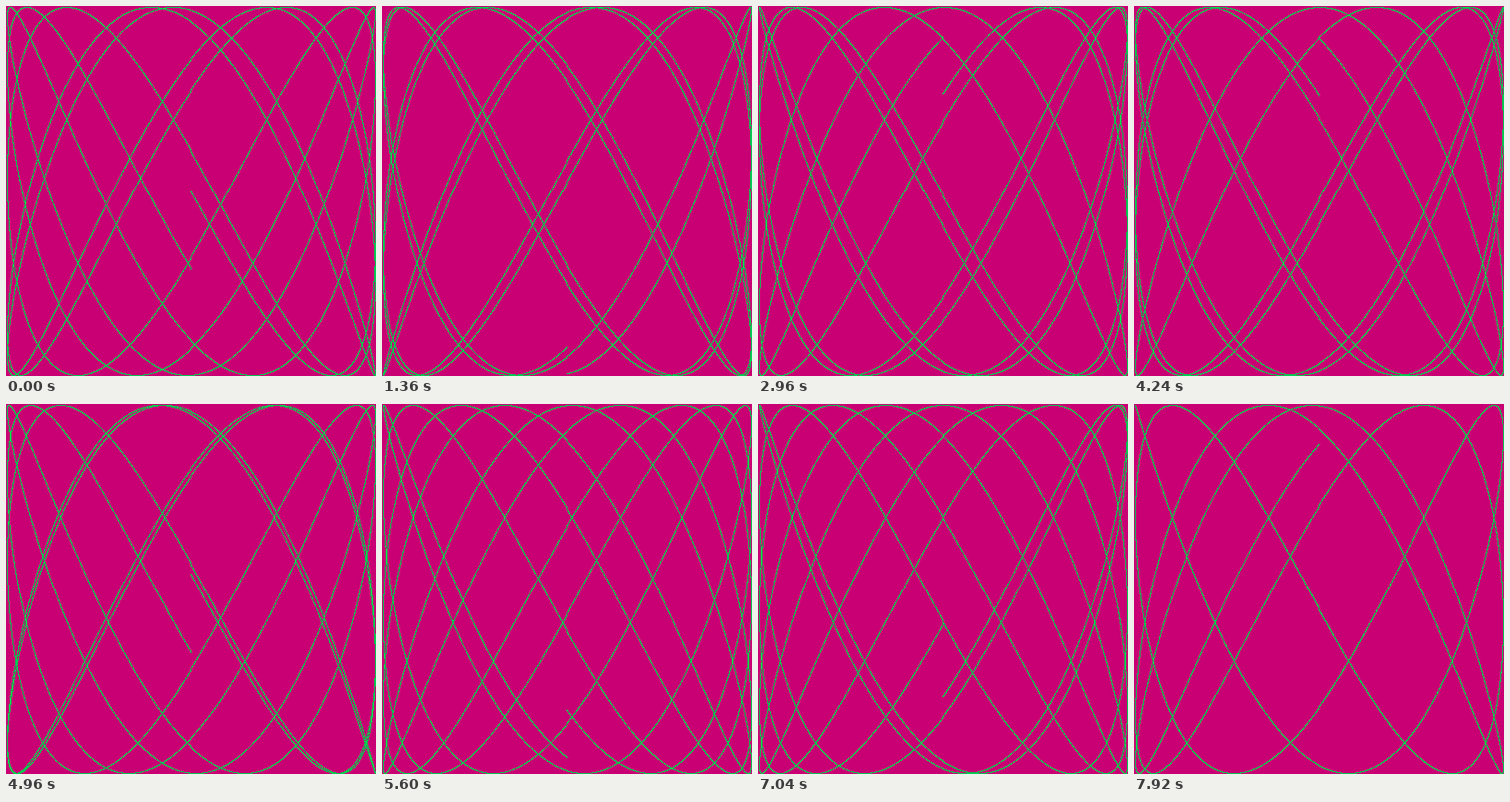
Write an HTML page with a canvas that moves like this. It is 401 px wide and 401 px high and loops after 8 s.

```html
<!DOCTYPE html>
<html lang="en">
<head>
<meta charset="utf-8">
<title>Lissajous</title>
<style>
  html, body { margin: 0; width: 100%; height: 100%; overflow: hidden; background: #c80073; }
  canvas { display: block; width: 401px; height: 401px; image-rendering: pixelated; }
</style>
</head>
<body>
<canvas id="stage" width="401" height="401"></canvas>
<script>
  const R = 200, SIDE = 2 * R + 1;
  const STEP_MS = 80, STEPS = 100;
  const CYCLES = 5, RES = 0.001;
  const FREQ = 1.8139808639388587, PHASE_STEP = 0.1;
  const BACK = [200, 0, 115], LINE = [0, 200, 80];

  const ctx = document.getElementById('stage').getContext('2d');
  const image = ctx.createImageData(SIDE, SIDE);
  // Bytes are written through a 32-bit view, lowest byte first.
  const pixels = new Uint32Array(image.data.buffer);
  const pack = ([r, g, b]) => (255 << 24 | b << 16 | g << 8 | r) >>> 0;
  const back = pack(BACK), line = pack(LINE);

  // Rounding towards the centre gives the small kinks on the axes.
  const place = v => R + Math.trunc(v * R + 0.5);

  function draw(step) {
    const phase = step * PHASE_STEP;
    pixels.fill(back);
    for (let t = 0; t < CYCLES * 2 * Math.PI; t += RES) {
      pixels[place(Math.sin(t * FREQ + phase)) * SIDE + place(Math.sin(t))] = line;
    }
    ctx.putImageData(image, 0, 0);
  }

  const start = performance.now();
  let shown = -1;

  function tick() {
    const elapsed = Math.max(0, performance.now() - start);
    const step = Math.floor(elapsed / STEP_MS) % STEPS;
    if (step !== shown) draw(shown = step);
    requestAnimationFrame(tick);
  }
  tick();
</script>
</body>
</html>
```
